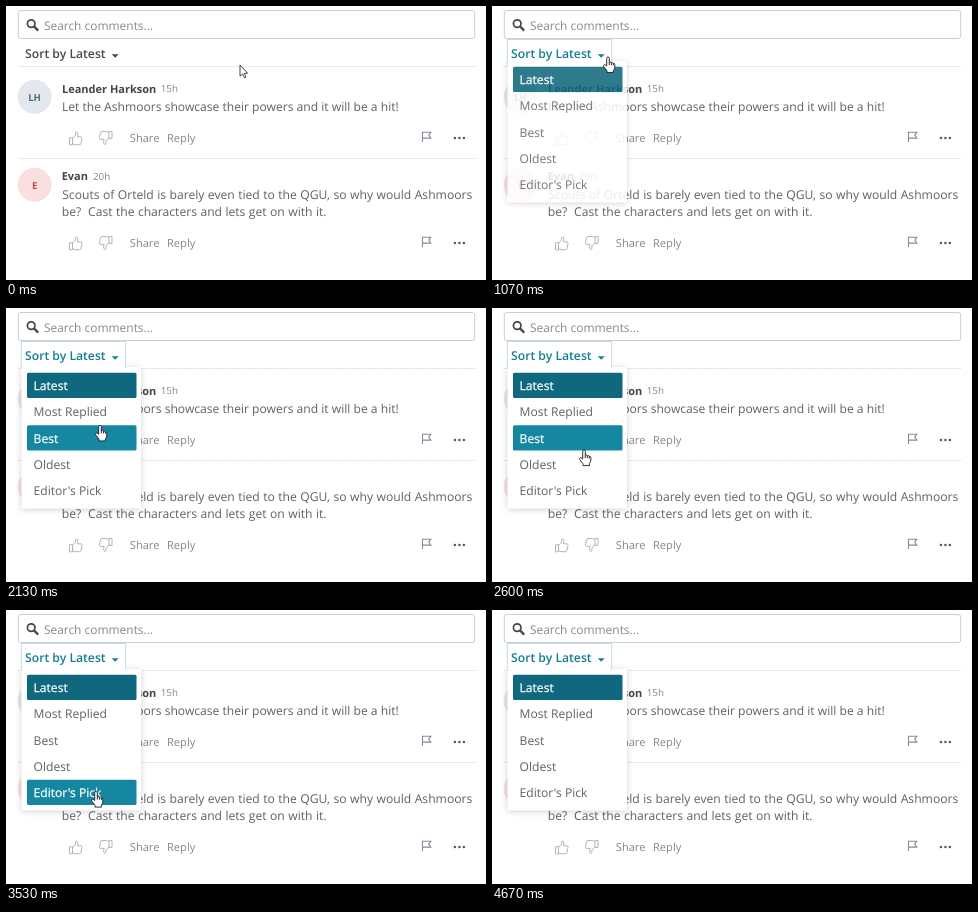
These frames come from a looping animation (480x274 px, 4990 ms). An HTML page:

```html
<!DOCTYPE html>
<html lang="en">
<head>
<meta charset="utf-8">
<title>Comment sorting</title>
<style>
  html, body { margin: 0; width: 100%; height: 100%; overflow: hidden; background: #fff; }
  svg { display: block; width: 100%; height: 100%; }
  text { font: 12.1px "Open Sans", "Noto Sans", sans-serif; fill: #5c6168; white-space: pre; text-rendering: geometricPrecision; }
  .name { font-size: 11px; font-weight: 700; fill: #41464d; }
  .age { font-size: 9.8px; fill: #83888e; }
  .link { font-size: 11.1px; fill: #83888e; }
  .initials { font-size: 9.6px; font-weight: 700; text-anchor: middle; }
  .hint { font-size: 11.95px; fill: #858990; }
  .sort { font-size: 12.2px; font-weight: 600; }
  .wide { font-size: 12.15px; word-spacing: .27px; }
  .lit { fill: #fff; stroke: #fff; stroke-width: .25; }
  .icon { fill: none; stroke: #a9adb3; stroke-width: .9; stroke-linejoin: round; }
  .flag { fill: none; stroke: #878a98; stroke-width: 1.1; }
  .rule { stroke: #dcdfe3; stroke-dasharray: 1.5 .8; }
  .panel { fill: #fff; filter: drop-shadow(0 1.5px 3px rgba(0, 0, 0, .18)); }
</style>
</head>
<body>
<svg viewBox="0 0 480 274" preserveAspectRatio="none">
  <defs>
    <path id="thumb" class="icon" d="M.5 6.5h3v7h-3zM3.5 7.2L6.6 3.6V1.2Q6.8.4 7.8.6Q9.2 1.2 8.9 3L8.3 5.5H12Q13.2 5.8 13 7L12 12Q11.7 13.4 10.5 13.4H6L3.5 12.3"/>
    <g id="actions">
      <use href="#thumb" x="63" y="-6.4"/>
      <use href="#thumb" transform="translate(106.5 7.2) rotate(180)"/>
      <text class="link" x="123.8" y="4">Share</text>
      <text class="link" x="161" y="4">Reply</text>
      <path class="flag" d="M416.5 4.2V-6M416.5 -5.5H424.8L422.8 -2.6L424.8 .4H416.5"/>
      <path d="M448.9 .4h.01M453.4 .4h.01M457.9 .4h.01" stroke="#555a60" stroke-width="2.5" stroke-linecap="round"/>
    </g>
  </defs>
  <rect width="480" height="274" fill="#fff"/>
  <rect x="12.3" y="4.5" width="456.4" height="28" rx="2.5" fill="#fff" stroke="#cbced2"/>
  <g fill="none" stroke="#43474c" stroke-width="1.7">
    <circle cx="25.2" cy="17.6" r="3.8"/>
    <path d="M28 20.4L32.2 24.6" stroke-width="2.2"/>
  </g>
  <text class="hint" x="37.9" y="24">Search comments...</text>
  <path class="rule" d="M12 60.5H469M12 152.5H469"/>

  <circle cx="28.6" cy="90.7" r="17" fill="#e4e7ee"/>
  <text class="initials" x="28.6" y="94.6" style="fill:#4d717c">LH</text>
  <text class="name" x="56" y="86.5">Leander Harkson</text>
  <text class="age" x="154.7" y="86.3">15h</text>
  <text x="56" y="105.3">Let the Ashmoors showcase their powers and it will be a hit!</text>
  <use href="#actions" y="131.7"/>

  <circle cx="28.6" cy="178.7" r="17" fill="#f9dfe0"/>
  <text class="initials" x="28.6" y="182.5" style="fill:#c94745">E</text>
  <text class="name" x="55.7" y="174.3">Evan</text>
  <text class="age" x="87" y="174">20h</text>
  <text class="wide" x="56.2" y="192.5">Scouts of Orteld is barely even tied to the QGU, so why would Ashmoors</text>
  <text class="wide" x="55.7" y="210">be?  Cast the characters and lets get on with it.</text>
  <use href="#actions" y="236.7"/>

  <g id="menu"><rect class="panel" x="15.5" y="59" width="119.5" height="141.5" rx="1"/></g>
  <path id="tab" d="M15.3 60V33.5H119.7V60" fill="#fff" stroke="#c2dce2"/>
  <g id="sort">
    <text class="sort" x="19" y="51.6" style="fill:inherit">Sort by Latest</text>
    <path d="M105.7 48.2h7l-3.5 3.5z"/>
  </g>
  <path id="arrow" d="M0 0V11.2L2.6 8.9L4.4 12.8L6 12.1L4.3 8.3H7.6z" fill="#fff" stroke="#333" stroke-width=".9"/>
  <path id="hand" d="M-1.3 9V1.2Q-1.2 0 0 0Q1.2 0 1.3 1.2V5.2Q2.6 4.6 3.4 5.7Q4.7 5.2 5.3 6.3Q6.8 6 6.8 7.6V10.6Q6.6 12.4 5.4 13.4V15.6H-1V13.8L-4.4 9.4Q-4.9 8.2-3.8 7.7Q-2.9 7.5-1.3 9zM1.3 5.2V8M3.4 5.7V8.2M5.3 6.3V8.5" fill="#fff" stroke="#222" stroke-width=".95" stroke-linejoin="round"/>
</svg>
<script>
const LOOP = 4990, STEP = 1000 / 15;
const OPEN = 13, DROP = 16;
const $ = id => document.getElementById(id);
const menu = $('menu'), tab = $('tab'), sort = $('sort'), arrow = $('arrow'), hand = $('hand');

// Pointer path: step, x, y
const path = [
  [0, 234, 59], [1, 225, 58], [4, 160, 54], [7, 116, 51], [19, 116, 51],
  [24, 100, 89.5], [27, 96, 100], [30, 96, 100], [33, 93, 126], [36, 93, 126],
  [39, 92, 142], [42, 92, 143], [43, 92, 144], [46, 92, 153], [48, 92, 153],
  [53, 90, 181.5], [56, 90, 183], [65, 90, 183], [68, 89, 232], [70, 88, 290]
];
// Hovered row from each step on
const hovers = [[0, -1], [24, 1], [32, 2], [43, 3], [50, 4], [68, -1]];

function add(parent, tag, attrs, text = '') {
  const el = document.createElementNS('http://www.w3.org/2000/svg', tag);
  for (const key in attrs) el.setAttribute(key, attrs[key]);
  el.textContent = text;
  return parent.appendChild(el);
}

const rows = ['Latest', 'Most Replied', 'Best', 'Oldest', "Editor's Pick"].map((label, i) => {
  const y = 64.7 + i * 26.25;
  return {
    bar: add(menu, 'rect', { x: 21, y, width: 109.5, height: 25.4, rx: 1.5 }),
    text: add(menu, 'text', { x: 27.6, y: y + 17.5 }, label)
  };
});

function pointer(k) {
  const i = path.findIndex(p => p[0] > k);
  if (i < 0) return path[path.length - 1].slice(1);
  const [k0, x0, y0] = path[i - 1], [k1, x1, y1] = path[i];
  const u = (k - k0) / (k1 - k0);
  return [x0 + (x1 - x0) * u, y0 + (y1 - y0) * u];
}

const show = (el, on) => el.setAttribute('visibility', on ? 'visible' : 'hidden');

function render(t) {
  const k = Math.floor((t + 4) / STEP);
  const [x, y] = pointer(k);
  const over = k >= 6;
  for (const el of [arrow, hand]) el.setAttribute('transform', `translate(${x} ${y})`);
  show(arrow, !over);
  show(hand, over);
  sort.setAttribute('fill', over ? '#137f93' : '#454a50');
  show(tab, k >= OPEN);
  show(menu, k >= DROP);
  menu.setAttribute('opacity', k === DROP ? .87 : 1);
  menu.setAttribute('transform', `translate(0 ${k === DROP ? -4 : 0})`);

  const hover = hovers.filter(h => h[0] <= k).pop()[1];
  rows.forEach(({ bar, text }, i) => {
    const lit = i === 0 || i === hover;
    bar.setAttribute('fill', i === 0 ? '#0f687d' : lit ? '#1587a1' : '#fff');
    text.classList.toggle('lit', lit);
  });
}

const start = performance.now();
function tick() {
  render((performance.now() - start) % LOOP);
  requestAnimationFrame(tick);
}
tick();
</script>
</body>
</html>
```
